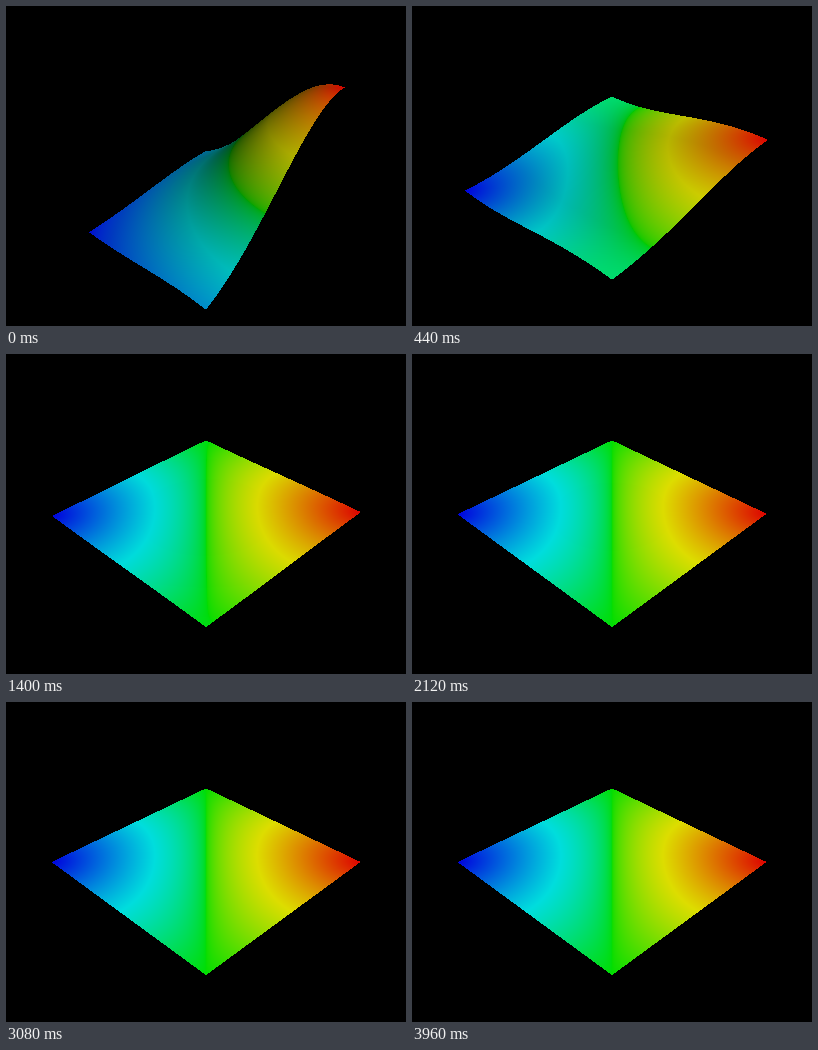
Recreate the animation shown at these times as an HTML page with a canvas. Size 400x320 px, loop 4 s.

```html
<!DOCTYPE html>
<html>
<head>
<meta charset="utf-8">
<style>
html, body { margin: 0; width: 100%; height: 100%; overflow: hidden; background: #000; }
canvas { display: block; }
</style>
</head>
<body>
<canvas id="stage" width="400" height="320"></canvas>
<script>
// A Gaussian bump in one corner of an insulated plate spreads out by diffusion.
const W = 400, H = 320, LOOP = 4000, STEP = 40;
const N = 64, MODES = 24, DECAY = 2.75, MIX_DECAY = 1.1;
const SIN = Math.sqrt(1 / 3), COS = Math.sqrt(2 / 3); // isometric elevation
const HALF_FOV = Math.PI / 12, FOCAL = H / 2 / Math.tan(HALF_FOV);

const ctx = document.getElementById('stage').getContext('2d');
const image = ctx.createImageData(W, H);
const pixels = new Uint32Array(image.data.buffer);
const clamp = v => Math.max(0, Math.min(1, v));

// Camera lights: elevation, azimuth (degrees), intensity
const lights = [[45, 45, 1], [-30, -60, 0.6], [-30, 60, 0.5]].map(([el, az, power]) => {
  const e = el * Math.PI / 180, a = az * Math.PI / 180;
  return [Math.cos(e) * Math.sin(a), Math.sin(e), Math.cos(e) * Math.cos(a), power];
});

// Cosine series of the bump exp(-2 s^2) on 0..1
const series = Array.from({ length: MODES }, (_, n) => {
  const samples = 1000;
  let sum = 0;
  for (let i = 0; i < samples; i++) {
    const s = (i + 0.5) / samples;
    sum += Math.exp(-2 * s * s) * Math.cos(n * Math.PI * s);
  }
  return sum / samples * (n ? 2 : 1);
});

function profile(time) {
  return Array.from({ length: N + 1 }, (_, i) => {
    if (time === 0) return Math.exp(-2 * (i / N) ** 2) - series[0];
    let sum = 0;
    for (let n = 1; n < MODES; n++)
      sum += series[n] * Math.exp(-n * n * DECAY * time) * Math.cos(n * Math.PI * i / N);
    return sum;
  });
}

function shade(zx, zy) {
  const len = Math.hypot(zx, zy, 1);
  const nx = -zx / len, ny = -zy / len, nz = 1 / len;
  const up = ny * SIN + nz * COS, toward = nz * SIN - ny * COS;
  let sum = 0;
  for (const [x, y, z, power] of lights)
    sum += power * Math.max(0, nx * x + up * y + toward * z);
  return Math.min(1, sum);
}

// Blue to red rainbow with a square-root ramp
function color(level, light) {
  const hue = 4 * (1 - clamp(level));
  const channel = v => Math.round(255 * light * Math.sqrt(clamp(v)));
  const r = channel(2 - hue), g = channel(Math.min(hue, 4 - hue)), b = channel(hue - 2);
  return (255 << 24 | b << 16 | g << 8 | r) >>> 0;
}

function buildMesh(time) {
  const g = profile(time), mix = Math.exp(-MIX_DECAY * time);
  const height = (i, j) => Math.SQRT2 * (series[0] * (g[i] + g[j]) + mix * g[i] * g[j]);
  const top = height(0, 0), bottom = height(N, N);
  const middle = (top + bottom) / 2, range = top - bottom;
  const distance = Math.hypot(1, range / 2) / Math.sin(HALF_FOV);

  const slope = f => k => {
    const a = Math.max(0, k - 1), b = Math.min(N, k + 1);
    return (f(b) - f(a)) * N / (b - a);
  };
  const mesh = [];
  for (let i = 0; i <= N; i++) {
    for (let j = 0; j <= N; j++) {
      const x = 1 - (i + j) / N, y = (i - j) / N, z = height(i, j) - middle;
      const depth = distance + y * COS - z * SIN;
      const di = slope(k => height(k, j))(i), dj = slope(k => height(i, k))(j);
      mesh.push({
        x: W / 2 + FOCAL * x / depth,
        y: H / 2 - FOCAL * (y * SIN + z * COS) / depth,
        level: z / range + 0.5,
        light: shade(-(di + dj) / 2, (di - dj) / 2)
      });
    }
  }
  return mesh;
}

function fillTriangle(a, b, c) {
  const area = (b.x - a.x) * (c.y - a.y) - (c.x - a.x) * (b.y - a.y);
  if (!area) return;
  const x0 = Math.floor(Math.min(a.x, b.x, c.x)), x1 = Math.ceil(Math.max(a.x, b.x, c.x));
  const y0 = Math.floor(Math.min(a.y, b.y, c.y)), y1 = Math.ceil(Math.max(a.y, b.y, c.y));
  for (let py = y0; py < y1; py++) {
    for (let px = x0; px < x1; px++) {
      const dx = px + 0.5 - a.x, dy = py + 0.5 - a.y;
      const v = (dx * (c.y - a.y) - (c.x - a.x) * dy) / area;
      const w = ((b.x - a.x) * dy - dx * (b.y - a.y)) / area;
      const u = 1 - v - w;
      if (u < -1e-6 || v < -1e-6 || w < -1e-6) continue;
      pixels[py * W + px] = color(
        u * a.level + v * b.level + w * c.level,
        u * a.light + v * b.light + w * c.light);
    }
  }
}

function draw(time) {
  const mesh = buildMesh(time);
  const at = (i, j) => mesh[i * (N + 1) + j];
  pixels.fill(0xff000000);
  // Far cells first, so nearer ones cover them
  for (let i = N - 1; i >= 0; i--) {
    for (let j = 0; j < N; j++) {
      const a = at(i, j), b = at(i + 1, j), c = at(i + 1, j + 1), d = at(i, j + 1);
      fillTriangle(a, b, c);
      fillTriangle(a, c, d);
    }
  }
  ctx.putImageData(image, 0, 0);
}

let shown = -1;
function tick() {
  const step = Math.floor(performance.now() % LOOP / STEP);
  if (step !== shown) draw(step * STEP / 1000);
  shown = step;
  requestAnimationFrame(tick);
}
tick();
</script>
</body>
</html>
```
